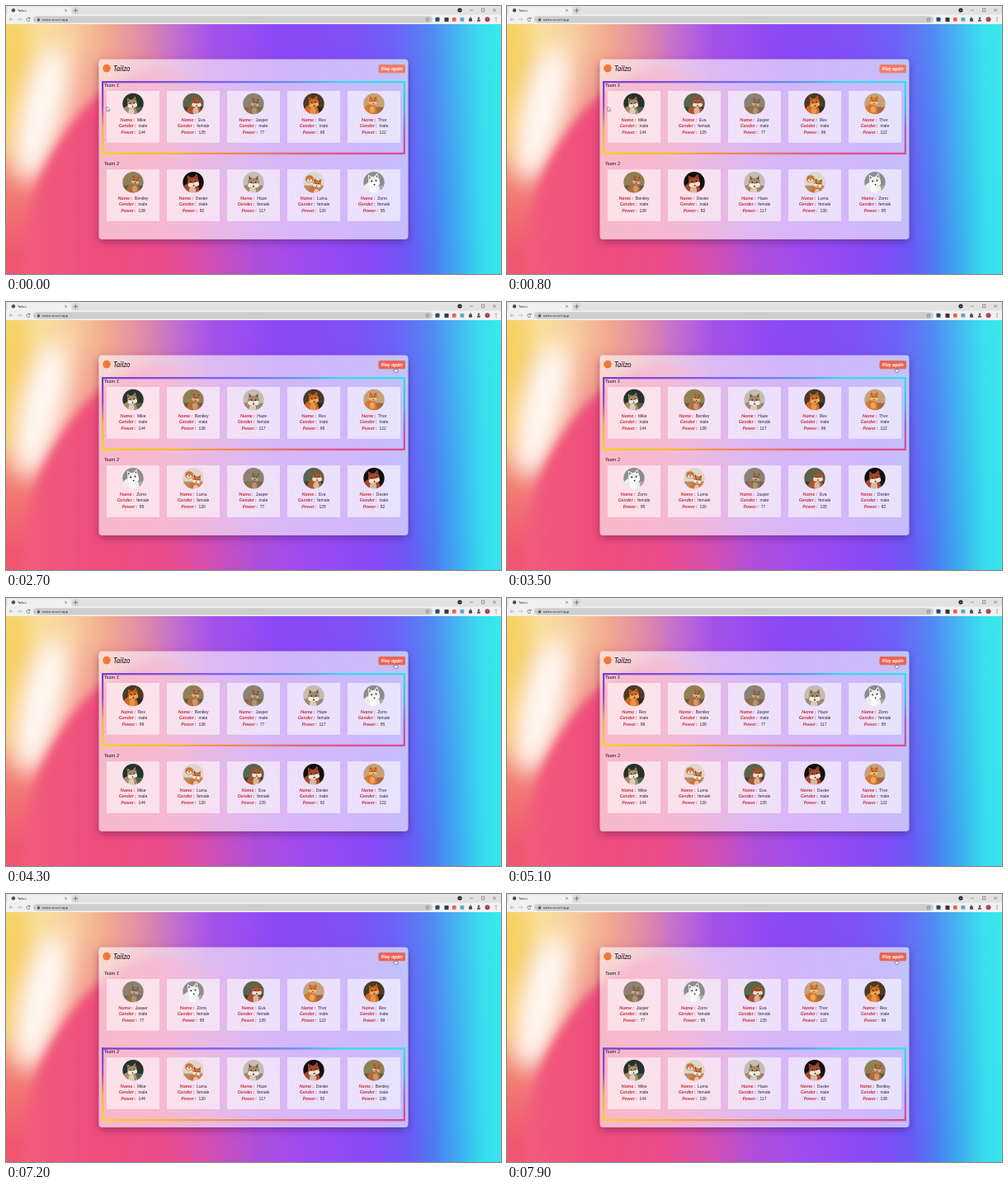
Recreate the animation shown at these times as an HTML page. Size 600x325 px, loop 8 s.

```html
<!DOCTYPE html>
<html lang="en">
<head>
<meta charset="utf-8">
<title>Tailzo</title>
<style>
html, body { margin: 0; width: 100%; height: 100%; overflow: hidden; background: #fff; }
svg { display: block; width: 600px; height: 325px; }
text { font-family: "Liberation Sans", Arial, sans-serif; font-size: 5px; fill: #2a2530; }
.script { font-family: Lato, "Open Sans", sans-serif; font-style: italic; font-weight: 500; }
.label { font-family: Lato, "Open Sans", sans-serif; font-style: italic; font-weight: 700; font-size: 5.9px; fill: #c62f3f; }
.ui { fill: none; stroke: #5a5d61; stroke-width: .7; }
</style>
</head>
<body>
<svg id="stage" viewBox="0 0 600 325" xmlns="http://www.w3.org/2000/svg">
  <defs>
    <linearGradient id="fade" x2="0" y2="1"><stop offset=".08" stop-color="#000"/><stop offset=".92" stop-color="#fff"/></linearGradient>
    <mask id="low"><rect y="22" width="600" height="303" fill="url(#fade)"/></mask>
    <filter id="soft" x="-60%" y="-50%" width="220%" height="200%"><feGaussianBlur stdDeviation="13"/></filter>
    <filter id="edge" x="-20%" y="-20%" width="140%" height="140%"><feGaussianBlur stdDeviation="6"/></filter>
    <filter id="shade" x="-10%" y="-15%" width="120%" height="130%"><feGaussianBlur stdDeviation="5"/></filter>
    <filter id="fur"><feGaussianBlur stdDeviation=".65"/></filter>
    <clipPath id="page"><rect y="22" width="600" height="303"/></clipPath>
    <clipPath id="round"><circle r="12.7"/></clipPath>
    <mask id="outside"><rect width="600" height="325" fill="#fff"/><rect x="112.5" y="64.5" width="375" height="218.5" rx="4"/></mask>
  </defs>
  <g id="back" clip-path="url(#page)"></g>
  <g id="chrome"></g>
  <g id="panel"></g>
  <g id="frame"></g>
  <g id="foxes"></g>
  <g id="pointer">
    <path id="arrow" d="M0 0V5.6L1.4 4.4L2.3 6.3L3.2 5.9L2.4 4.1H4.1Z" fill="#fff" stroke="#333" stroke-width=".45"/>
    <path id="hand" d="M-.6 .6Q0-.5.6.6V2.7L2.6 3.1Q3.3 3.3 3.2 4.2L2.7 6.4H-.7L-2.3 4.1Q-2.3 3.1-.6 4Z" fill="#fff" stroke="#222" stroke-width=".5"/>
  </g>
</svg>
<script>
const LOOP = 8000;
const $ = id => document.getElementById(id);
const stage = $("stage");

function add(parent, tag, attrs, text) {
  const node = document.createElementNS(stage.namespaceURI, tag);
  for (const key in attrs) node.setAttribute(key, attrs[key]);
  if (text !== undefined) node.textContent = text;
  parent.append(node);
  return node;
}
const rect = (p, x, y, width, height, fill, rx = 0) => add(p, "rect", { x, y, width, height, fill, rx });
const dot = (p, cx, cy, r, fill) => add(p, "circle", { cx, cy, r, fill });
const oval = (p, cx, cy, rx, ry, fill, more) => add(p, "ellipse", { cx, cy, rx, ry, fill, ...more });

// stops: "x colour, x colour" measured in stage pixels along the line
function gradient(id, stops, x1, y1, x2, y2) {
  const g = add(stage.querySelector("defs"), "linearGradient", { id, gradientUnits: "userSpaceOnUse", x1, y1, x2, y2 });
  const start = y1 === y2 ? x1 : y1, span = y1 === y2 ? x2 - x1 : y2 - y1;
  for (const stop of stops.split(",")) {
    const [at, color] = stop.trim().split(" ");
    add(g, "stop", { offset: (at - start) / span, "stop-color": color });
  }
  return `url(#${id})`;
}

function drawBackground(g) {
  const top = gradient("top", "0 #f6d468, 40 #f8dd98, 80 #f7cda0, 120 #f2ac90, 165 #e28ca6, 205 #c26fd0, 250 #a453ea, 330 #8d49f7, 420 #8052f8, 470 #6e62f7, 515 #5288f4, 550 #43bcf1, 578 #3be0ef, 600 #38e9ec", 0, 0, 600, 0);
  const low = gradient("bottom", "0 #f0586f, 100 #f0497a, 195 #ea4b8c, 245 #d04fb6, 295 #b350d8, 350 #a14ced, 400 #954bf4, 450 #854af7, 490 #6a5af6, 520 #4b7df2, 550 #3baef0, 580 #38dcee, 600 #38e6ee", 0, 0, 600, 0);
  const pink = gradient("pink", "0 #f2617a, 110 #ef4d7b, 180 #ec4c88cc, 300 #c850c000", 0, 0, 330, 0);
  const soft = { filter: "url(#soft)" };
  rect(g, 0, 22, 600, 303, top);
  add(g, "rect", { y: 22, width: 600, height: 303, fill: low, mask: "url(#low)" });
  oval(g, 0, 95, 22, 95, "#f6d264", soft);
  oval(g, 42, 130, 27, 85, "#fff8f1", { ...soft, transform: "rotate(14 42 130)" });
  add(g, "path", { d: "M20 360C22 300 24 245 40 212C58 172 82 132 118 104C150 82 170 75 200 75L330 120V360Z", fill: pink, filter: "url(#edge)" });
  add(g, "rect", { x: 112.5, y: 68, width: 375, height: 218, rx: 4, fill: "#30104a", opacity: .4, filter: "url(#shade)", mask: "url(#outside)" });
}

function drawChrome(g) {
  const line = (d, more) => add(g, "path", { d, class: "ui", ...more });
  const label = (x, y, size, text) => add(g, "text", { x, y, style: `font-size:${size}px` }, text);
  rect(g, 0, 0, 600, 11, "#e2e2e3");
  rect(g, 2, 1, 77, 11, "#f1f1f1", 2);
  rect(g, 0, 10.5, 600, 11.5, "#f1f1f1");
  dot(g, 9, 5.3, 2.2, "#4d5156");
  label(14, 7, 4.2, "Tailzo");
  line("M71.2 4L73.8 6.6M73.8 4L71.2 6.6");
  dot(g, 84.5, 5.5, 4.2, "#d2d2d3");
  line("M82.3 5.5H86.7M84.5 3.3V7.7");
  dot(g, 550, 5, 2.6, "#202124");
  line("M549 4.5L550 5.6L551 4.5", { style: "stroke:#fff" });
  line("M562 5H566M576.5 3.2H580V6.7H576.5ZM590.3 3.2L594 6.9M594 3.2L590.3 6.9", { style: "stroke-width:.6" });
  line("M8.5 16.2H4M6 14.2L4 16.2L6 18.2", { opacity: .55 });
  line("M14 16.2H18.5M16.5 14.2L18.5 16.2L16.5 18.2", { opacity: .4 });
  line("M28.6 15A2.1 2.1 0 1 0 29 17M29 13.7V15.4H27.3");
  rect(g, 33, 12.2, 484, 8.2, "#cdcdce", 4.1);
  rect(g, 38, 15.7, 3, 2.5, "#4d5156", .3);
  line("M38.6 16V15Q39.5 13.3 40.4 15V16", { style: "stroke-width:.6" });
  label(44, 17.9, 4.3, "tailzo.vercel.app");
  line("M511 14L511.7 15.6L513.4 15.7L512.1 16.8L512.5 18.5L511 17.5L509.5 18.5L509.9 16.8L508.6 15.7L510.3 15.6Z", { style: "stroke-width:.5" });
  rect(g, 520.5, 13.8, 5, 5, "#234c6c", .6);
  rect(g, 531.5, 14, 5, 5, "#33373d", .5);
  rect(g, 541, 14, 4.5, 4.8, "#ec604c", .5);
  rect(g, 550.5, 14, 4.7, 4.7, "#55a9d6", .5);
  rect(g, 561, 15, 4, 3.8, "#4d5156", .5);
  dot(g, 563, 14.6, 1, "#4d5156");
  dot(g, 573, 14.7, 1.3, "#4d5156");
  rect(g, 571, 16.4, 4, 2.3, "#4d5156", .8);
  dot(g, 583.5, 16.3, 3, "#a9474f");
  for (const y of [14.4, 16.3, 18.2]) dot(g, 594, y, .55, "#4d5156");
}

const slotX = i => 154 + 73 * (i % 5);
const slotY = i => i < 5 ? 118.5 : 213.7;
const TEAM_GAP = 95.3;
let button;

function drawPanel(g) {
  rect(g, 112.5, 64.5, 375, 218.5, "#ffffff99", 4);
  dot(g, 122, 75.6, 4.8, "#ee7a35");
  add(g, "text", { x: 130, y: 78.8, class: "script", style: "font-size:8.8px" }, "Tailzo");
  button = rect(g, 451.5, 71, 32.5, 10.2, "#f07b6b", 1.8);
  add(g, "text", { x: 467.8, y: 78.1, class: "script", "text-anchor": "middle", style: "font-size:6px;fill:#fff;font-weight:700" }, "Play again");
  for (const n of [0, 1])
    add(g, "text", { x: 119, y: 98 + n * TEAM_GAP, class: "script", style: "font-size:6px" }, "Team " + (n + 1));
  for (let i = 0; i < 10; i++) rect(g, slotX(i) - 32, slotY(i) - 15.5, 64, 62.7, "#ffffff94");
}

function drawFrame(g) {
  const across = gradient("across", "116 #7a3cd8, 270 #7a62f0, 360 #5a9cf0, 410 #2fe0ea, 484 #2fe3ec", 116, 0, 484, 0);
  const under = gradient("under", "116 #f8d514, 190 #f5bd2e, 300 #ee7a60, 400 #e2508c, 484 #e0478f", 116, 0, 484, 0);
  const left = gradient("left", "91 #7a3cd8, 122 #a650b8, 148 #efb343, 180 #f8d514", 0, 91, 0, 180);
  const right = gradient("right", "91 #2fe3ec, 122 #48bcf0, 148 #a068dc, 180 #e0478f", 0, 91, 0, 180);
  rect(g, 116, 91, 2.3, 89, left);
  rect(g, 481.7, 91, 2.3, 89, right);
  rect(g, 116, 91, 368, 2.3, across);
  rect(g, 116, 177.7, 368, 2.3, under);
}

// name, gender, power, backdrop, lower backdrop, fur, pale fur, head x, head y, head size
const FOXES = [
  ["Mike", "male", 144, "#26332a", "#51604a", "#a98c68", "#efe8d8", -1, 0, 6],
  ["Eva", "female", 135, "#59644a", "#39412f", "#a95531", "#ecdfca", 4, -1, 6],
  ["Jasper", "male", 77, "#8c8272", "#786752", "#91704e", "#b9a68c", 2, -1, 5],
  ["Rex", "male", 99, "#493a27", "#2b2824", "#d2691f", "#eda85b", 0, -1, 6],
  ["Thor", "male", 122, "#c6a27c", "#a36a3c", "#d9772c", "#f0b979", -1, -3, 5],
  ["Bentley", "male", 138, "#8f8055", "#6b583c", "#ae6c3d", "#d4ae83", 3, -2, 5],
  ["Dexter", "male", 82, "#100e0d", "#20140f", "#a6482a", "#eee2d5", 0, 0, 7],
  ["Haze", "female", 117, "#c3bdb3", "#978777", "#a58769", "#efe9e1", 0, 1, 7],
  ["Luma", "female", 130, "#ded6cc", "#bc895f", "#c7763d", "#f3e4d0", 4, 2, 5],
  ["Zorro", "female", 95, "#8b8d8f", "#aaa8a7", "#eeeced", "#ffffff", 0, -1, 7]
];

function drawPhoto(g, index, sky, ground, fur, pale, x, y, size) {
  const photo = add(add(g, "g", { "clip-path": "url(#round)" }), "g", { filter: "url(#fur)" });
  const tilt = index % 3 * 9 - 9;
  dot(photo, 0, 0, 14, sky);
  rect(photo, -14, 4, 28, 10, ground);
  oval(photo, x - 3, y + 11, size * 1.5, size * 1.5, fur);
  oval(photo, x - 1, y + 10, size * .6, size * .8, pale, { opacity: .7 });
  if (index === 8) {
    oval(photo, -5, -4, 5, 4.5, fur);
    oval(photo, -5, -2.3, 3, 2, pale);
    dot(photo, -5, -2.7, .8, "#33241d");
  }
  const head = add(photo, "g", { transform: `translate(${x} ${y}) rotate(${tilt}) scale(${size / 6})` });
  add(head, "path", { d: "M-5.5-1L-5-8L0-4L5-8L5.5-1Z", fill: fur });
  add(head, "path", { d: "M-4.3-3L-4.2-6L-2.3-4M4.3-3L4.2-6L2.3-4", fill: "#493a35" });
  oval(head, 0, 0, 6, 5, fur);
  oval(head, -3, 2.3, 2.8, 2.4, pale);
  oval(head, 3, 2.3, 2.8, 2.4, pale);
  oval(head, 0, 3.2, 1.8, 2.2, pale);
  for (const [ex, ey] of [[-2.3, -.5], [2.3, -.5], [0, 3.4]]) dot(head, ex, ey, .8, "#241b18");
}

function makeFox([name, gender, power, ...look], index) {
  const g = add($("foxes"), "g", {});
  drawPhoto(g, index, ...look);
  [["Name", name], ["Gender", gender], ["Power", power]].forEach(([key, value], row) => {
    const line = add(g, "text", { x: 0, y: 21.3 + row * 7.5, "text-anchor": "middle" });
    add(line, "tspan", { class: "label" }, key + " :");
    add(line, "tspan", { dx: 2.8 }, value);
  });
  return g;
}

// start time, fox order across both teams, highlighted team
const ROUNDS = [
  [0, "0123456789", 0],
  [2600, "0573498216", 0],
  [4200, "3527908164", 0],
  [5700, "4605198237", 0],
  [7200, "2914308765", 1]
];
// time, x, y
const PATH = [[0, 122, 122], [1050, 122, 122], [1800, 469.5, 66], [2000, 469.5, 66], [2300, 471.8, 78.8], [LOOP, 471.8, 78.8]];

function pointerAt(t) {
  const i = PATH.findIndex(p => p[0] > t);
  const [t0, x0, y0] = PATH[i - 1], [t1, x1, y1] = PATH[i];
  const u = (t - t0) / (t1 - t0), k = u * u * (3 - 2 * u);
  return [x0 + (x1 - x0) * k, y0 + (y1 - y0) * k];
}

drawBackground($("back"));
drawChrome($("chrome"));
drawPanel($("panel"));
drawFrame($("frame"));
const foxes = FOXES.map(makeFox);
let shown;

function render(now) {
  const t = now % LOOP;
  const round = ROUNDS.findLast(r => r[0] <= t);
  if (round !== shown) {
    shown = round;
    [...round[1]].forEach((fox, slot) =>
      foxes[fox].setAttribute("transform", `translate(${slotX(slot)} ${slotY(slot)})`));
    $("frame").setAttribute("transform", `translate(0 ${round[2] * TEAM_GAP})`);
  }
  const [x, y] = pointerAt(t);
  const over = x > 451.5 && y > 71 && y < 81.2;
  $("pointer").setAttribute("transform", `translate(${x} ${y})`);
  $("arrow").style.display = over ? "none" : "";
  $("hand").style.display = over ? "" : "none";
  button.setAttribute("fill", over ? "#ed6553" : "#f07b6b");
}

const start = performance.now();
function tick() {
  render(performance.now() - start);
  requestAnimationFrame(tick);
}
tick();
</script>
</body>
</html>
```
